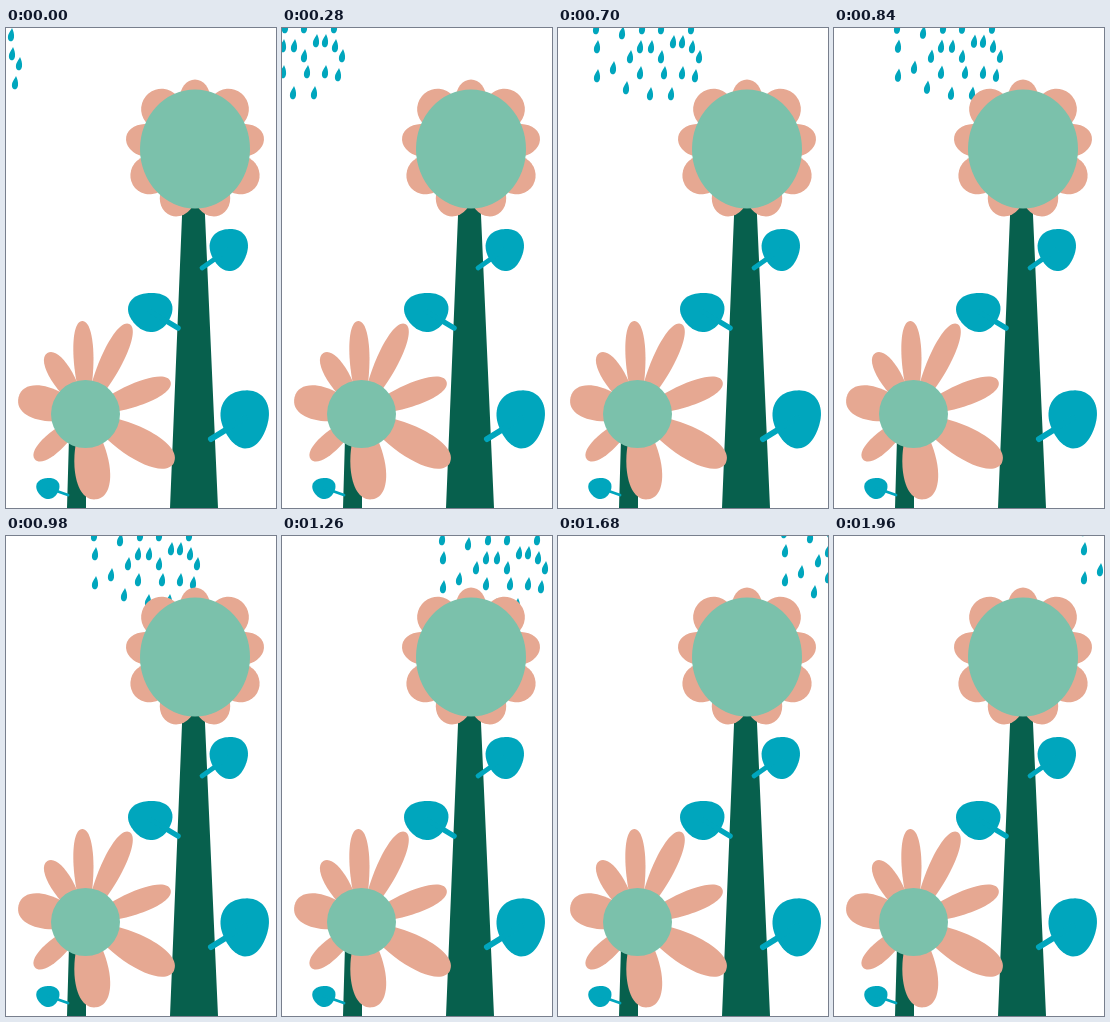
Write an HTML page with a canvas that moves like this. It is 270 by 480 pixels and loops after 2100 ms.

```html
<!DOCTYPE html>
<html lang="en">
<head>
<meta charset="utf-8">
<title>Rain over flowers</title>
<style>
  html, body { margin: 0; width: 100%; height: 100%; overflow: hidden; background: #fff; }
  canvas { display: block; }
</style>
</head>
<body>
<canvas id="stage" width="270" height="480"></canvas>
<script>
const ctx = document.getElementById('stage').getContext('2d');
const PINK = '#e6a892', MINT = '#7bc1ab', DARK = '#07604d', TEAL = '#00a6bd';
const STEP = 140, LOOP = 2100;
const DEG = Math.PI / 180;

const stems = new Path2D('M176.5 176H198.5L212 480H164ZM63 410H80V480H61Z');
const drop = new Path2D('M1 -7C2.4 -4 3.4 -1 3 2.4C2.6 5.4 .6 6.6 -1 6.2C-3 5.6 -3.6 2.6 -2.6 -.4C-1.8 -2.8 0 -4.4 1 -7Z');

// Rows of the cloud: height, then the drops along it
const rain = [
  [0, 38, 84, 103, 133], [5, 64], [14, 115, 124], [19, 39, 82, 93, 134],
  [29, 72, 103, 141], [40, 55], [45, 82, 106, 124], [48, 39, 137], [60, 68], [66, 92, 113]
];

// Cloud path: step, x, y
const drift = [
  [0, -128, 7], [2, -81, -1], [5, 0, 0], [7, 50, -1], [9, 122, 3], [12, 188, -4], [14, 211, -6]
];

function cloudAt(step) {
  const i = Math.max(1, drift.findIndex(key => key[0] >= step));
  const [a, b] = [drift[i - 1], drift[i]];
  const part = (step - a[0]) / (b[0] - a[0]);
  return [1, 2].map(k => a[k] + (b[k] - a[k]) * part);
}

function ellipse(color, x, y, rx, ry, angle = 0) {
  ctx.fillStyle = color;
  ctx.beginPath();
  ctx.ellipse(x, y, rx, ry, angle, 0, 2 * Math.PI);
  ctx.fill();
}

// Long petal growing from (x, y), widest towards its tip
function petal(x, y, degrees, length, halfWidth) {
  const h = halfWidth / 0.75;
  ctx.save();
  ctx.translate(x, y);
  ctx.rotate(degrees * DEG);
  ctx.fillStyle = PINK;
  ctx.beginPath();
  ctx.moveTo(0, 0);
  ctx.bezierCurveTo(length * 0.4, -h, length, -h, length, 0);
  ctx.bezierCurveTo(length, h, length * 0.4, h, 0, 0);
  ctx.fill();
  ctx.restore();
}

// Rounded, slightly three-cornered leaf with a stalk
function leaf(x, y, rx, ry, stalkX, stalkY) {
  ctx.fillStyle = ctx.strokeStyle = TEAL;
  ctx.lineWidth = rx / 4;
  ctx.lineCap = 'round';
  ctx.beginPath();
  for (let a = 0; a < 360; a += 5) {
    const r = 1 + 0.05 * Math.cos(3 * (a + 35) * DEG);
    ctx.lineTo(x + rx * r * Math.cos(a * DEG), y + ry * r * Math.sin(a * DEG));
  }
  ctx.fill();
  ctx.beginPath();
  ctx.moveTo(x, y);
  ctx.lineTo(stalkX, stalkY);
  ctx.stroke();
}

function tallFlower(x, y) {
  for (let i = 0; i < 9; i++) {
    const angle = (40 * i - 90) * DEG;
    const swell = -Math.cos(160 * i * DEG);
    const reach = 51 + 1.5 * swell;
    ellipse(PINK, x + reach * Math.cos(angle), y + reach * Math.sin(angle), 20, 18 + 2.5 * swell, angle);
  }
  ellipse(MINT, x, y, 55, 59.5);
}

function shortFlower(x, y) {
  petal(x, y, -92, 93, 10);
  petal(x, y, -64, 100, 11);
  petal(x, y, -21, 91, 11.5);
  petal(x, y, 29, 101, 16);
  petal(x, y, 83, 86, 17.5);
  petal(x, y, 138, 68, 10);
  petal(x, y, 194, 69, 17);
  petal(x, y, 238, 72, 11);
  ellipse(MINT, x, y, 34.5, 34);
}

function drawRain(step) {
  const [dx, dy] = cloudAt(step);
  ctx.fillStyle = TEAL;
  for (const [y, ...row] of rain) {
    for (const x of row) {
      ctx.save();
      ctx.translate(x + dx, y + dy);
      ctx.fill(drop);
      ctx.restore();
    }
  }
}

function draw() {
  ctx.clearRect(0, 0, 270, 480);
  drawRain(Math.floor((performance.now() - start) % LOOP / STEP));
  ctx.fillStyle = DARK;
  ctx.fill(stems);
  tallFlower(189, 121);
  shortFlower(79.5, 386);
  leaf(223, 221, 19, 21, 196, 240);
  leaf(144.5, 283.5, 22, 19.5, 172, 300);
  leaf(239, 390, 24, 29, 205, 411);
  leaf(42, 460, 11.5, 10.5, 62, 467);
  requestAnimationFrame(draw);
}

const start = performance.now();
draw();
</script>
</body>
</html>
```
